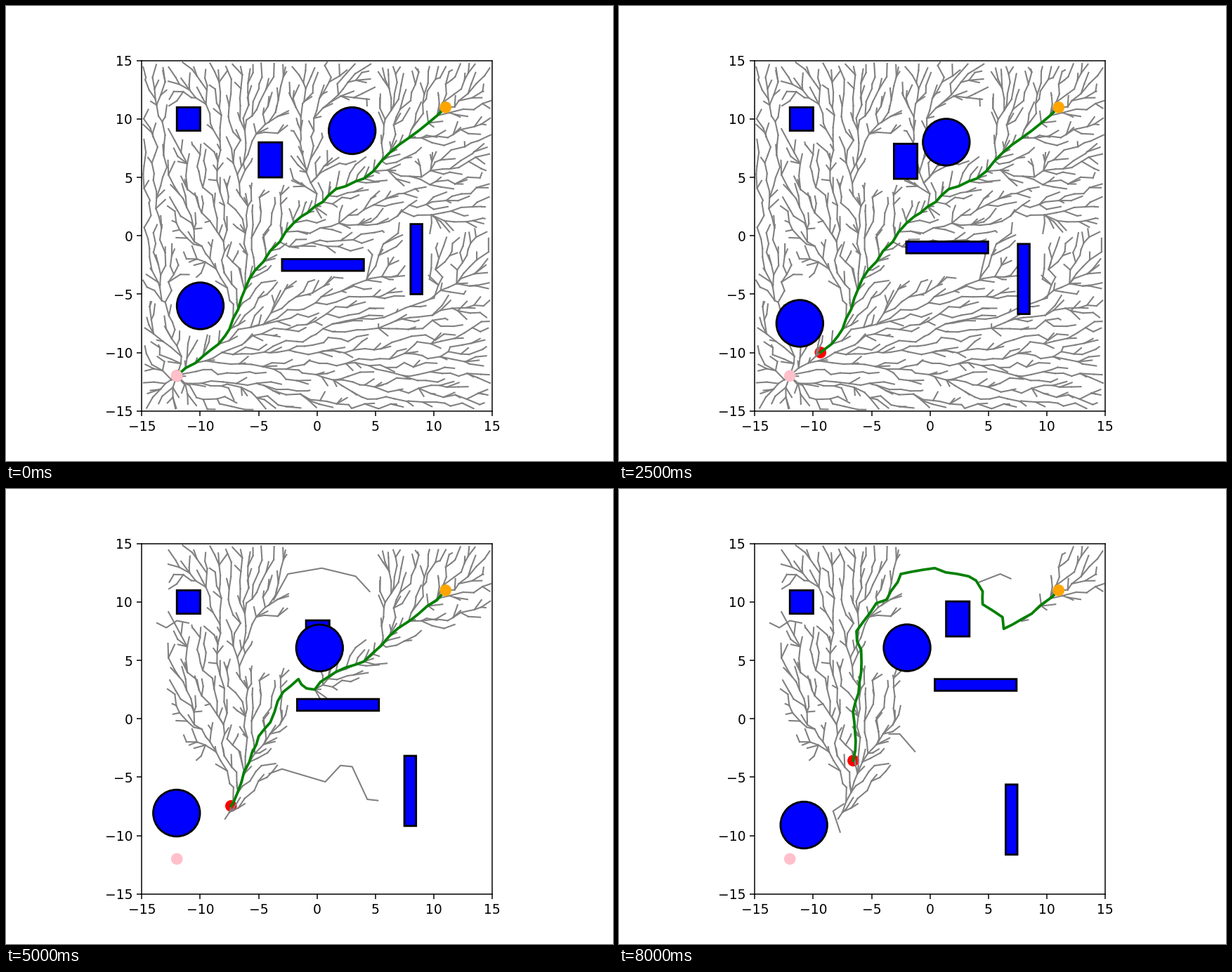
Animation, 864 px wide and 648 px high, one loop 8.5 s. Source, as a matplotlib script:

```python
import numpy as np
import matplotlib.pyplot as plt
from matplotlib.animation import FuncAnimation
from matplotlib.collections import LineCollection
from matplotlib.patches import Circle, Rectangle

FRAMES, INTERVAL = 17, 500
REPLANS = 6, 10, 11      # frames at which a new tree and route appear
SPEED = 0.66             # robot travel per frame
GRID, REACH = 42, 1.25   # scattered nodes per side, longest tree edge
CROWN, TIP, CORNER, LEDGE = 1, 2, 3, 4
rng = np.random.default_rng(11)

# Route key points
STEM = [(-12, -12), (-9, -9.7), (-7.5, -8)]
RISE = [(-5.8, -3.7), (-5, -1.5), (-4, -0.3)]
TAIL = [(1.6, 4), (4, 4.9), (6.2, 7.1), (8.7, 9), (11, 11)]
CLIMB = [(-7.3, -7.2), (-6.4, -2.7), (-6.6, 0.6), (-5.9, 4), (-5.9, 5.9),
         (-6.3, 7.5), (-4.6, 9.9), (-3.7, 10.2)]
ARCH = [(-3.7, 10.2), (-2.5, 12.4), (0.4, 12.9), (3.3, 12.2), (4.5, 10.9)]
DROP = [(4.5, 9.8), (6.2, 8.7), (6.3, 7.7)]

DIRECT = STEM + RISE[:1] + [(-2, 1.1), (-0.2, 2.5)] + TAIL
DIP = STEM + RISE + [(-3.3, 1.3), (-1.6, 2.1), (-0.9, 2.1)] + TAIL
BUMP = STEM + RISE + [(-2.9, 2.3), (-1.6, 3.4), (-0.9, 2.6), (-0.2, 2.5)] + TAIL
DETOUR = STEM + CLIMB + ARCH[1:] + DROP + TAIL[-2:]

# Branches regrown after a replan
SHOOTS = [
    ARCH,
    [(-4.1, -4.7), (-3, -4.3), (0.7, -5.4), (2, -4), (3, -4.1), (4.3, -6.9), (5.2, -7)],
    [(-13.7, 8.2), (-12.9, 7.8), (-12, 8.4), (-11, 8.2)],
]
LATE_SHOOTS = [
    [(-7.4, -7.3), (-8.3, -7.9), (-7.7, -9.7)],
    [(-3.5, -1.3), (-2.6, -1.3), (-1.3, -2.8)],
    [(4.2, 11.7), (6, 12.4), (6.9, 12)],
]

# Size and positions every four frames; rectangles by lower left corner
BOXES = [
    ((2, 2), [(-12, 9)] * 5),
    ((2, 3), [(-5, 5), (-3.58, 4.87), (-1.63, 4.9), (-0.26, 5.95), (1.37, 7.05)]),
    ((7, 1), [(-3, -3), (-2, -1.97), (-2.14, -0.08), (-1.28, 1.46), (0.4, 2.4)]),
    ((1, 6), [(8, -5), (7.5, -6.2), (7.56, -8.2), (7.38, -10.15), (6.47, -11.63)]),
]
DISCS = [
    (2, [(-10, -6), (-10.7, -7.35), (-12.5, -7.95), (-11.55, -8.2), (-10.8, -9.1)]),
    (2, [(3, 9), (1.64, 8.38), (0.62, 6.93), (-0.2, 5.2), (-1.97, 6.08)]),
]


def along(points, s):
    """Position at arc length s on a polyline."""
    x, y = np.array(points, float).T
    length = np.r_[0, np.hypot(np.diff(x), np.diff(y)).cumsum()]
    return np.stack([np.interp(s, length, x), np.interp(s, length, y)], -1)


def at(stops, frame):
    x, y = np.transpose(stops)
    times = range(0, FRAMES, 4)
    return np.interp(frame, times, x), np.interp(frame, times, y)


def roughen(points):
    """Split a route into short, slightly uneven steps."""
    out = [np.array(points[:1], float)]
    for a, b in zip(np.array(points), np.array(points[1:])):
        n = int(np.ceil(np.hypot(*(b - a)) / 1.05))
        t = np.arange(1, n + 1)[:, None] / n
        out.append(a + (b - a) * t + (t < 1) * rng.normal(0, 0.08, (n, 2)))
    return np.vstack(out)


def is_clear(p, margin):
    """True where points keep their distance from all bodies at the start."""
    ok = np.ones(len(p), bool)
    for size, stops in BOXES:
        half = np.array(size) / 2
        gap = np.maximum(np.abs(p - stops[0] - half) - half, 0)
        ok &= np.hypot(*gap.T) > margin
    for r, stops in DISCS:
        ok &= np.hypot(*(p - stops[0]).T) > r + margin
    return ok


def nearest(p, q):
    return np.hypot(*(p[:, None] - q).transpose(2, 0, 1)).min(1)


def fan(p, tip, low, high):
    dx, dy = (p - tip).T
    angle = np.degrees(np.arctan2(dy, dx))
    return (angle > low) & (angle < high)


def region(p, route):
    """Part of the tree each point belongs to; 0 is lost at the first replan."""
    x = p[:, 0]
    return np.select([
        fan(p, (-7.3, -8.6), 48, 122) & (np.abs(x + 7.6) < 5.2),
        fan(p, (8, 8.3), 20, 62),
        fan(p, (5, 5.5), 19, 90),
        (nearest(p, route) < 1.4) & (x > 0) & (x < 6),
    ], [CROWN, TIP, CORNER, LEDGE], 0)


def scatter(route):
    """The route's nodes first, then a jittered grid around them."""
    cells = np.stack(np.meshgrid(*[np.arange(GRID)] * 2), -1).reshape(-1, 2)
    p = (cells + rng.uniform(0, 1, cells.shape)) * 29.8 / GRID - 14.9
    return np.vstack([route, p[(nearest(p, route) > 0.35) & is_clear(p, 0.45)]])


def grow(nodes, part, trunk):
    """Shortest path tree from the first node; only the trunk joins regions."""
    x, y = nodes.T
    dist = np.hypot(x[:, None] - x, y[:, None] - y)
    i, j = np.nonzero((dist < REACH) & (dist > 0))
    free = (part[i] == part[j]) | (i < trunk) | (j < trunk)
    for t in (0.25, 0.5, 0.75):
        free &= is_clear(nodes[i] * (1 - t) + nodes[j] * t, 0.3)
    i, j = i[free], j[free]
    weight = np.full(dist.shape, np.inf)
    weight[i, j] = dist[i, j] * rng.uniform(1, 1.12, len(i))
    k = np.arange(trunk - 1)
    weight[k, k + 1] = 0.93 * dist[k, k + 1]

    cost = np.full(len(nodes), np.inf)
    cost[0] = 0
    parent = np.full(len(nodes), -1)
    todo = np.ones(len(nodes), bool)
    while True:
        k = np.argmin(np.where(todo, cost, np.inf))
        if not todo[k] or np.isinf(cost[k]):
            break
        todo[k] = False
        better = todo & (cost[k] + weight[k] < cost)
        cost[better] = cost[k] + weight[k][better]
        parent[better] = k
    child = np.flatnonzero(parent >= 0)
    return np.stack([nodes[parent[child]], nodes[child]], 1), part[child]


routes = [roughen(keys) for keys in (DIRECT, DIP, BUMP, DETOUR)]
nodes = scatter(routes[0])
edges, label = grow(nodes, region(nodes, routes[0]), len(routes[0]))


def keep(*parts):
    return list(edges[np.isin(label, parts)])


trees = [
    list(edges),
    keep(CROWN, TIP, CORNER, LEDGE),
    keep(CROWN, TIP, CORNER, LEDGE) + SHOOTS,
    keep(CROWN, TIP) + SHOOTS[2:] + LATE_SHOOTS,
]

fig, ax = plt.subplots(figsize=(6.4, 4.8), dpi=135)
ticks = range(-15, 16, 5)
ax.set(aspect="equal", xlim=(-15, 15), ylim=(-15, 15), xticks=ticks, yticks=ticks)

robot = ax.add_patch(Circle(STEM[0], 0.5, color="red", lw=0, zorder=1))
tree = ax.add_collection(LineCollection([], colors="gray", linewidths=1.1,
                                        capstyle="projecting", zorder=2))
trail, = ax.plot([], [], color="green", lw=2, zorder=3)
style = dict(facecolor="blue", edgecolor="black", lw=1.5, snap=False, zorder=4)
boxes = [ax.add_patch(Rectangle((0, 0), *size, **style)) for size, _ in BOXES]
discs = [ax.add_patch(Circle((0, 0), r, **style)) for r, _ in DISCS]
for spot, color in ((STEM[0], "pink"), (TAIL[-1], "orange")):
    ax.add_patch(Circle(spot, 0.5, color=color, lw=0, zorder=5))


def draw(frame):
    stage = sum(frame >= start for start in REPLANS)
    here, route = along(DETOUR, SPEED * frame), routes[stage]
    ahead = np.argmax(route[:, 1] > here[1] + 0.05)
    tree.set_segments(trees[stage])
    trail.set_data(*np.vstack([here, route[ahead:]]).T)
    robot.center = here
    for box, (_, stops) in zip(boxes, BOXES):
        box.set_xy(at(stops, frame))
    for disc, (_, stops) in zip(discs, DISCS):
        disc.center = at(stops, frame)
    return [tree, trail, robot, *boxes, *discs]


anim = FuncAnimation(fig, draw, frames=FRAMES, interval=INTERVAL, repeat=True)
plt.show()
```
